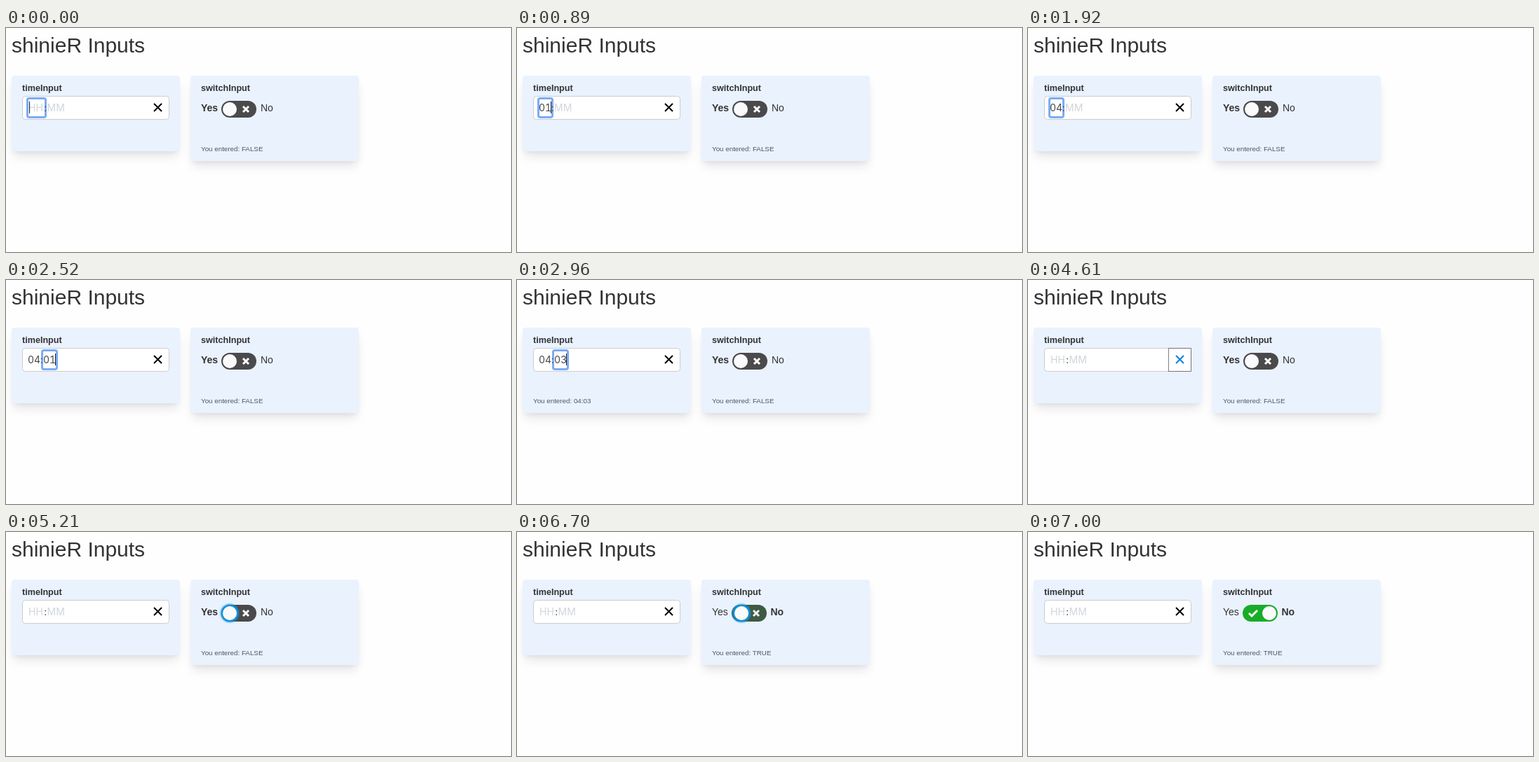
An HTML page for the animation above (7.9 s loop, 720 px wide and 320 px high).

```html
<!DOCTYPE html>
<html lang="en">
<head>
<meta charset="utf-8">
<title>shinieR Inputs</title>
<style>
  html, body { margin: 0; width: 100%; height: 100%; overflow: hidden; background: #fefefe; }
  .card {
    position: absolute; top: 68px; width: 240px; height: 122px;
    border-radius: 4px; background: #eaf2fe;
    box-shadow: 0 10px 15px -3px rgba(0, 0, 0, .1), 0 4px 6px -2px rgba(0, 0, 0, .05);
  }
  #timeCard { left: 8px; }
  #switchCard { left: 263px; }
  svg { position: absolute; left: 0; top: 0; }
  text { font: 14px "Liberation Sans", Arial, sans-serif; fill: #333; white-space: pre; }
  .title { font-size: 30px; }
  .label { font-size: 12.6px; font-weight: bold; }
  .entered { font-size: 9.8px; fill: #4b5768; }
  .field { font-family: Inter, sans-serif; font-variant-numeric: tabular-nums; fill: #484848; }
  .field.empty { fill: #d0d5da; }
  .bold { font-weight: bold; }
  .line { fill: none; stroke: #fff; stroke-width: 3; }
  #ring { fill: #fff; stroke: #7aacf6; stroke-width: 3; }
  #glow { fill: #1093de; filter: blur(1px); }
</style>
</head>
<body>
<div class="card" id="timeCard"></div>
<div class="card" id="switchCard"></div>
<svg width="720" height="320" viewBox="0 0 720 320">
  <text class="title" x="8" y="35">shinieR Inputs</text>

  <text class="label" x="23" y="90">timeInput</text>
  <rect x="23.5" y="97.5" width="209" height="33" rx="4" fill="#fff" stroke="#ccc"/>
  <rect id="ring" y="100.5" height="27" rx="2.5"/>
  <text id="hours" class="field" y="119"></text>
  <text id="colon" class="field" y="119" text-anchor="middle">:</text>
  <text id="minutes" class="field" y="119"></text>
  <rect id="caret" y="105" width="1" height="17" fill="#222"/>
  <rect id="clearOutline" x="200.5" y="97.5" width="32" height="33" fill="#fff" stroke="#000" stroke-dasharray="1 1"/>
  <path id="clearCross" d="M211 108l11 11m0-11l-11 11" fill="none" stroke-width="2"/>
  <text id="timeEntered" class="entered" x="23" y="176"></text>

  <text class="label" x="278" y="90">switchInput</text>
  <text id="yes" x="278" y="119">Yes</text>
  <g id="toggle">
    <rect id="track" y="104" width="50" height="24" rx="12"/>
    <path id="cross" class="line" d="M31 112l8 8m0-8l-8 8"/>
    <path id="check" class="line" d="M9 116l4 4 8-8"/>
    <circle id="glow" cy="116" r="13"/>
    <circle id="knob" cy="116" r="10" fill="#fafafa"/>
  </g>
  <text id="no" y="119">No</text>
  <text id="switchEntered" class="entered" x="278" y="176"></text>
</svg>
<script>
  const LOOP = 7900;
  const $ = id => document.getElementById(id);
  const set = (id, attrs) => {
    for (const [name, value] of Object.entries(attrs)) $(id).setAttribute(name, value);
  };
  const show = (id, visible) => { $(id).style.display = visible ? "" : "none"; };

  const start = {
    hours: "", minutes: "", focus: "hours", caret: true,
    entered: false, on: false, glow: 0, slide: 0, track: "#4a4a4c"
  };

  // Each step lists only what changes at that time.
  const steps = [
    [0, {}],
    [290, { caret: false }],
    [890, { hours: "01", caret: true }],
    [1330, { caret: false }],
    [1480, { hours: "02", caret: true }],
    [1630, { hours: "04" }],
    [1920, { caret: false }],
    [2070, { focus: "minutes", caret: true }],
    [2520, { minutes: "01" }],
    [2660, { minutes: "02", entered: true }],
    [2960, { minutes: "03" }],
    [3110, { minutes: "04" }],
    [3260, { minutes: "05" }],
    [3410, { minutes: "07" }],
    [3710, { focus: "clear", caret: false }],
    [4610, { hours: "", minutes: "", entered: false }],
    [4910, { focus: "switch", glow: .45 }],
    [5060, { glow: .9 }],
    [5210, { glow: 1 }],
    [6700, { on: true, slide: .08, track: "#3f5a43" }],
    [6850, { glow: 0, slide: .5, track: "#17ad28" }],
    [7000, { slide: 1 }]
  ];

  function drawField(id, value, hint, x) {
    $(id).textContent = value || hint;
    $(id).classList.toggle("empty", !value);
    set(id, { x });
  }

  function drawTime(s) {
    const shift = s.hours ? 0 : 5.5;
    drawField("hours", s.hours, "HH", s.hours ? 31 : 32);
    drawField("minutes", s.minutes, "MM", 53 + shift);
    set("colon", { x: 50.7 + shift });

    const inHours = s.focus === "hours";
    const value = s[s.focus];
    const left = inHours ? 29 : 50;
    const width = value ? (inHours ? 23 : 24) : (inHours ? 29 : 33);
    show("ring", inHours || s.focus === "minutes");
    set("ring", { x: left + 1.5, width: width - 3 });
    show("caret", s.caret);
    set("caret", { x: value ? (inHours ? 48 : 70) : left + 4 });

    const clearing = s.focus === "clear";
    show("clearOutline", clearing);
    set("clearCross", { stroke: clearing ? "#0a80da" : "#000" });

    $("timeCard").style.height = s.entered ? "122px" : "108px";
    $("timeEntered").textContent = s.entered ? `You entered: ${s.hours}:${s.minutes}` : "";
  }

  function drawSwitch(s) {
    const cx = 12 + s.slide * 26;
    set("toggle", { transform: `translate(${s.on ? 306 : 307} 0)` });
    set("track", { fill: s.track });
    set("knob", { cx });
    set("glow", { cx, opacity: s.glow });
    set("cross", { opacity: 1 - s.slide });
    set("check", { opacity: s.slide });
    $("yes").classList.toggle("bold", !s.on);
    $("no").classList.toggle("bold", s.on);
    set("no", { x: s.on ? 361.5 : 363 });
    $("switchEntered").textContent = `You entered: ${s.on ? "TRUE" : "FALSE"}`;
  }

  function frame() {
    const time = performance.now() % LOOP;
    const state = { ...start };
    for (const [at, change] of steps) if (at <= time) Object.assign(state, change);
    drawTime(state);
    drawSwitch(state);
    requestAnimationFrame(frame);
  }
  frame();
</script>
</body>
</html>
```
